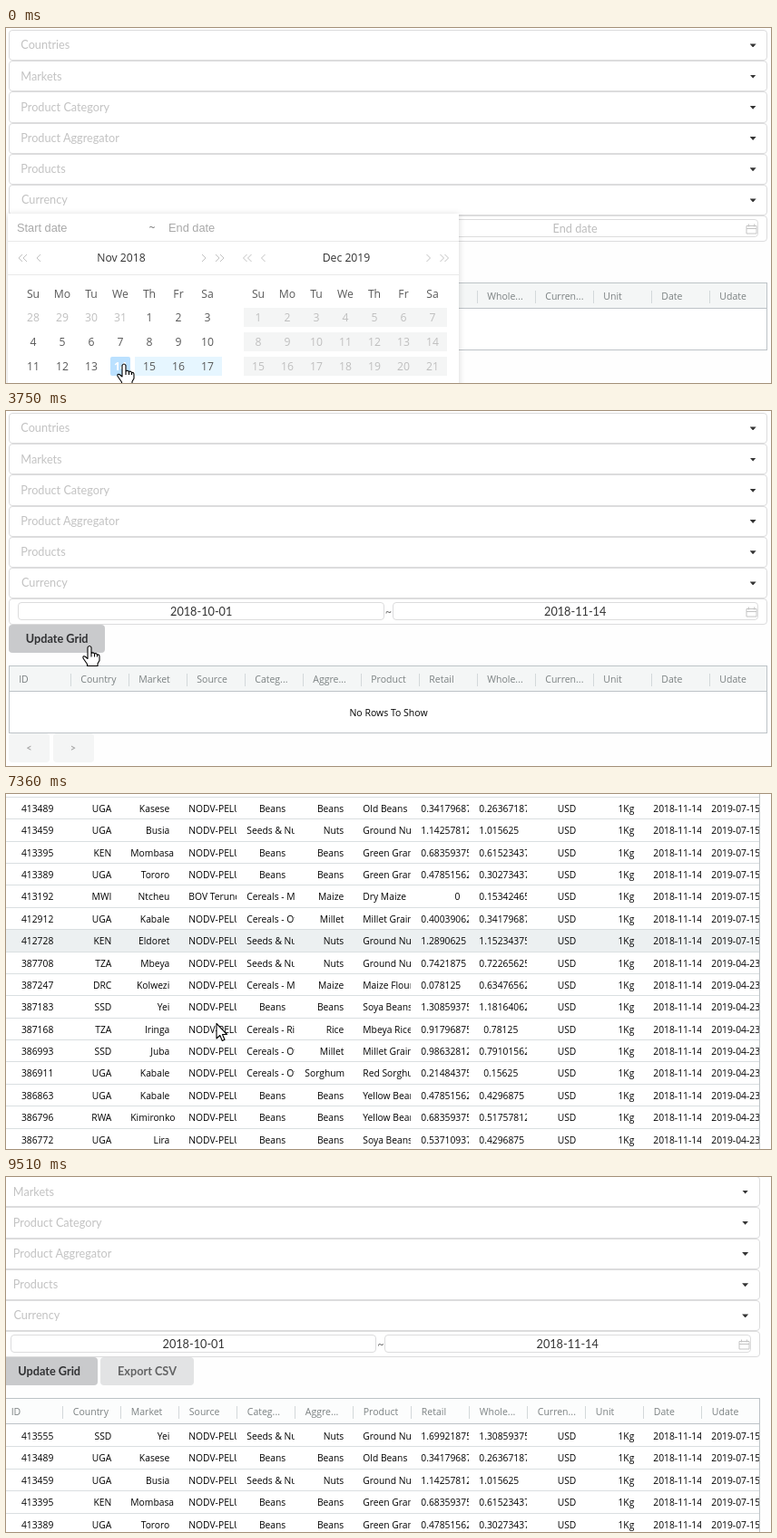
Recreate the animation shown at these times as an HTML page. Size 843 by 392 pixels, loop 9.81 s.

```html
<!DOCTYPE html>
<html lang="en">
<head>
<meta charset="utf-8">
<title>Price grid filter</title>
<style>
html, body { margin: 0; width: 100%; height: 100%; overflow: hidden; background: #fefefe; }
div, svg { position: absolute; box-sizing: border-box; white-space: nowrap; }
svg { overflow: visible; left: 0; top: 0; width: 1px; height: 1px; fill: none; }
#stage { inset: 0; overflow: hidden; font: 12.7px Lato, sans-serif; }
.field, .input { border: 1px solid #dcdcdd; border-radius: 4px; background: #fff; }
.caret { background: #333; clip-path: polygon(0 0, 100% 0, 50% 100%); }
.btn { border-radius: 4px; text-align: center; font-weight: bold; }
.mid { text-align: center; }
.grid { font: 10.5px "Open Sans", sans-serif; border: 1px solid #bdc3c7; overflow: hidden; background: #fff; }
.row { border-bottom: 1px solid #dadfe1; color: #000; font-size: 10.3px; }
.cell { overflow: hidden; text-align: right; padding: 0 10px 0 11px; }
.popup { background: #fff; box-shadow: 0 1px 7px rgba(0,0,0,.17); transform-origin: 0 0; }
.cal { font: 12.2px "Open Sans", sans-serif; color: #595959; }
.day { border-radius: 2px; }
</style>
</head>
<body>
<div id="stage"></div>
<script>
const stage = document.getElementById('stage');

function box(parent, x, y, w, h, cls = '', text = '', css = '') {
  const e = document.createElement('div');
  e.className = cls;
  e.style.cssText = `left:${x}px;top:${y}px;width:${w}px;height:${h}px;line-height:${h}px;${css}`;
  e.textContent = text;
  parent.append(e);
  return e;
}
const label = (parent, x, cy, text, css, cls = '') => box(parent, x, cy - 8, 200, 16, cls, text, css);
const centred = (parent, cx, cy, text, css, cls = '') => box(parent, cx - 60, cy - 8, 120, 16, 'mid ' + cls, text, css);
function icon(parent, paths) {
  parent.insertAdjacentHTML('beforeend', `<svg>${paths}</svg>`);
  return parent.lastChild;
}

// Filters
const page = box(stage, 0, 0, 843, 1000);
['Countries', 'Markets', 'Product Category', 'Product Aggregator', 'Products', 'Currency'].forEach((name, i) => {
  const y = 2 + 34.2 * i;
  box(page, 3.2, y, 836.3, 34.2, 'field');
  label(page, i == 5 ? 17 : 16.3, y + 16.4, name, 'color:#c3c3c3');
  box(page, 819.6, y + 15.4, 7, 4, 'caret');
});
box(page, 3.2, 207.2, 836.3, 28.6, 'field');
box(page, 13.4, 211.4, 403.4, 19.6, 'input');
box(page, 425.6, 211.4, 403.8, 19.6, 'input');
centred(page, 421.5, 221, '~', 'color:#777');
const dates = [centred(page, 215.2, 221.3, ''), centred(page, 627.2, 221.3, '')];
icon(page, '<path stroke="#c4c4c4" d="M816 218.5h11v8.5h-11zM816 221.5h11M818.5 216.5v3M824.5 216.5v3"/>');
const update = box(page, 3.2, 235.6, 106, 31.6, 'btn', 'Update Grid', 'color:#303133');
const exporter = box(page, 112.5, 235.6, 103, 31.6, 'btn', 'Export CSV', 'color:#626364;background:#e2e3e4');

// Grid
const colX = c => c ? 64 * c + 6.8 : 3.2;
const colW = c => c ? 64 : 67.6;
const ROW = 24.37, ROW0 = 311.1;
const grid = box(page, 3.2, 281, 836.3, 74.6, 'grid');
const inner = box(grid, -4.2, -282, 843, 900);
const head = box(inner, 3.2, 282, 836.3, 28, '', '', 'border-bottom:1px solid #bdc3c7');
['ID', 'Country', 'Market', 'Source', 'Categ...', 'Aggre...', 'Product', 'Retail', 'Whole...', 'Curren...', 'Unit', 'Date', 'Udate']
  .forEach((name, c) => {
    label(inner, colX(c) + (c ? 11.5 : 11), 296, name, 'color:#7b8182');
    box(inner, colX(c + 1) - .3, 290, 1, 14, '', '', 'background:#d3d8da');
  });

const SRC = 'NODV-PELUS';
const rows = `413555,SSD,Yei,,Seeds & Nuts,Nuts,Ground Nuts,1.69921875,1.30859375
413489,UGA,Kasese,,Beans,Beans,Old Beans,0.34179687,0.26367187
413459,UGA,Busia,,Seeds & Nuts,Nuts,Ground Nuts,1.14257812,1.015625
413395,KEN,Mombasa,,Beans,Beans,Green Gram,0.68359375,0.61523437
413389,UGA,Tororo,,Beans,Beans,Green Gram,0.47851562,0.30273437
413192,MWI,Ntcheu,BOV Terundi,Cereals - Maize,Maize,Dry Maize,0,0.15342465
412912,UGA,Kabale,,Cereals - Other,Millet,Millet Grain,0.40039062,0.34179687
412728,KEN,Eldoret,,Seeds & Nuts,Nuts,Ground Nuts,1.2890625,1.15234375
387708,TZA,Mbeya,,Seeds & Nuts,Nuts,Ground Nuts,0.7421875,0.72265625
387247,DRC,Kolwezi,,Cereals - Maize,Maize,Maize Flour,0.078125,0.63476562
387183,SSD,Yei,,Beans,Beans,Soya Beans,1.30859375,1.18164062
387168,TZA,Iringa,,Cereals - Rice,Rice,Mbeya Rice,0.91796875,0.78125
386993,SSD,Juba,,Cereals - Other,Millet,Millet Grain,0.98632812,0.79101562
386911,UGA,Kabale,,Cereals - Other,Sorghum,Red Sorghum,0.21484375,0.15625
386863,UGA,Kabale,,Beans,Beans,Yellow Beans,0.47851562,0.4296875
386796,RWA,Kimironko,,Beans,Beans,Yellow Beans,0.68359375,0.51757812
386772,UGA,Lira,,Beans,Beans,Soya Beans,0.53710937,0.4296875`.split('\n').map((line, i) => {
  const row = box(inner, 0, ROW0 + ROW * i, 840, ROW, 'row');
  const vals = [...line.split(','), 'USD', '1Kg', '2018-11-14', i < 8 ? '2019-07-15' : '2019-04-23'];
  vals.forEach((v, c) => box(row, colX(c), 0, colW(c), ROW, 'cell', v || SRC));
  return row;
});

const empty = box(page, 0, 0, 1, 1);
centred(empty, 421.5, 333, 'No Rows To Show', 'font:10.5px/16px "Open Sans",sans-serif;color:#000');
box(empty, 3, 356, 45, 32, 'btn', '<', 'background:#f4f5f5;color:#aaa;font-size:11px');
box(empty, 51.5, 356, 45, 32, 'btn', '>', 'background:#f4f5f5;color:#aaa;font-size:11px');

// Date popup
const popup = box(page, 2, 205, 497, 300, 'popup');
const cal = box(popup, -2, -205, 1, 1, 'cal');
const arial = 'font:12.8px/16px "Liberation Sans",sans-serif;color:#a9a9a9';
label(cal, 12, 220.5, 'Start date', arial);
centred(cal, 161, 221, '~', 'color:#777');
label(cal, 179, 220.5, 'End date', arial);
for (const y of [235, 272]) box(cal, 2, y, 497, 1, '', '', 'background:#e9e9e9');
const chev = (x, d) => `M${x + 2 * d} 250l${-4 * d} 4l${4 * d} 4`;
const title = centred(cal, 127, 254.3, '', 'font-weight:500;color:#333');
centred(cal, 375, 254.3, 'Dec 2019', 'font-weight:500;color:#333');
let arrows = '';
for (const x of [0, 247.5])
  arrows += chev(16 + x, 1) + chev(21 + x, 1) + chev(36 + x, 1) + chev(218 + x, -1) + chev(233 + x, -1) + chev(238 + x, -1);
icon(cal, `<path stroke="#c2c2c2" d="${arrows}"/>`);
for (const x of [14, 262])
  ['Su', 'Mo', 'Tu', 'We', 'Th', 'Fr', 'Sa'].forEach((d, c) => centred(cal, x + 16 + 32 * c, 293.5, d));
const days = [];
for (let i = 0; i < 21; i++) {
  const x = 32 * (i % 7), y = 309 + 27 * Math.floor(i / 7);
  const band = box(cal, 14 + x, y, 32, 21);
  days.push({ band, day: box(band, 5, 0, 22, 21, 'day mid') });
  box(cal, 262 + x, y, 32, 21, 'mid', i + 1, 'background:#f4f5f5;color:#bfbfbf');
}

// Cursors, drawn from their hot spot
const ink = 'fill="#fff" stroke="#000" stroke-width="1.1" stroke-linejoin="round"';
const hand = icon(stage, `<path ${ink} d="M-2 1.5Q0-1.5 2 1.5V8Q4 6.5 5.5 8.5Q7.5 7.5 8.5 9.5Q11 9 11 11.5V16L9 19.5V22H-2.5V20L-7 13.5Q-7.5 10.5-5 11.5L-2 14ZM2 8V12M5.5 8.5V12M8.5 9.5V12"/>`);
const arrow = icon(stage, `<path ${ink} d="M0 0V16.5L3.8 13L6.3 19L9 17.8L6.5 12H11.5Z"/>`);

// Progress 0..1 in n jumps, the first at a, the last at b
const steps = (t, a, b, n) =>
  Math.max(0, Math.min(n, Math.floor((t - a) / (b - a) * (n - 1) + 1.001))) / n;
const latest = (keys, t, start) => keys.reduce((v, k) => t >= k[0] ? k[1] : v, start);

// [start, end, jumps, x, y]
const moves = [
  [150, 960, 7, 36, 252], [1340, 1710, 4, 68, 325], [2260, 3090, 7, 76, 304],
  [3210, 3750, 5, 92, 259.5], [4460, 4461, 1, 113, 261], [4770, 5670, 8, 232, 253.5], [9080, 9510, 4, 240, 412]
];
function pointer(t) {
  let x = 130, y = 371;
  for (const [a, b, n, tx, ty] of moves) {
    const p = n == 1 ? +(t >= a) : steps(t, a, b, n);
    x += (tx - x) * p;
    y += (ty - y) * p;
  }
  return [x, y];
}
const scrolls = [[5430, 14], [5550, 30], [5670, 37], [5950, 90], [6070, 131], [6380, 137], [6500, 200], [6650, 237],
  [7360, 331.5], [7480, 337], [7750, 300], [7900, 243], [8030, 230.7], [8180, 110], [8330, 37]];
const hovers = [[6500, 3], [7080, 7], [8330, -1]];
const picked = new Date(2018, 10, 14);

function drawCalendar(t, x, y) {
  const month = t < 1210 ? 10 : 9;
  title.textContent = month == 10 ? 'Nov 2018' : 'Oct 2018';
  const first = new Date(2018, month, 1).getDay();
  const date = i => new Date(2018, month, 1 - first + i);
  const c = Math.floor((x - 14) / 32), r = Math.floor((y - 306) / 27);
  const inside = c >= 0 && c < 7 && r >= 0 && r < 3;
  const lo = inside ? date(r * 7 + c) : picked;
  days.forEach(({ band, day }, i) => {
    const d = date(i), end = +d == +lo || +d == +picked;
    const between = d > lo && (t < 150 || d < picked);
    band.style.background = between ? '#e6f6ff' : 'none';
    day.textContent = d.getDate();
    day.style.background = !end ? 'none' : t < 150 ? '#bbe1ff' : '#1890ff';
    day.style.color = end ? '#fff' : d.getMonth() == month ? '#595959' : '#bfbfbf';
    day.style.fontWeight = end ? 'bold' : 'normal';
  });
}

const show = (e, on) => e.style.display = on ? '' : 'none';

function draw(t) {
  const [x, y] = pointer(t);
  const scroll = latest(scrolls, t, 0), loaded = t >= 4770;
  const shift = loaded ? -8.5 : 0;
  page.style.left = shift + 'px';
  page.style.top = -scroll + 'px';

  const closing = steps(t, 2140, 2380, 3);
  show(popup, closing < 1);
  popup.style.opacity = 1 - closing;
  popup.style.transform = closing ? `scaleY(${1 - .2 * closing})` : 'none';
  if (closing < 1) drawCalendar(t, x, y);

  const chosen = t >= 2140;
  dates.forEach((e, i) => {
    e.textContent = chosen ? ['2018-10-01', '2018-11-14'][i] : ['Start date', 'End date'][i];
    e.style.color = chosen ? '#333' : '#bdbdbd';
  });

  const px = x - shift, py = y + scroll;
  const onButton = py > 236 && py < 268 && px > 3 && px < (loaded ? 215 : 109);
  update.style.background = t >= 3750 || chosen && onButton ? '#c9cacc' : '#e0e1e2';
  show(exporter, loaded);
  show(empty, !loaded);
  grid.style.height = (loaded ? 640 : 74.6) + 'px';
  head.style.background = loaded ? '#fcfdfd' : '#f4f6f6';

  const hover = t >= 9080 && t < 9510 ? Math.floor((py - ROW0) / ROW) : latest(hovers, t, -1);
  rows.forEach((row, i) => {
    show(row, loaded);
    row.style.background = i == hover ? '#ecf0f1' : 'none';
  });

  const pointing = closing < 1 || onButton;
  show(hand, pointing);
  show(arrow, !pointing && t < 9510);
  for (const c of [hand, arrow]) c.style.transform = `translate(${x}px,${y}px)`;
}

function tick() {
  draw(performance.now() % 9810);
  requestAnimationFrame(tick);
}
tick();
</script>
</body>
</html>
```
